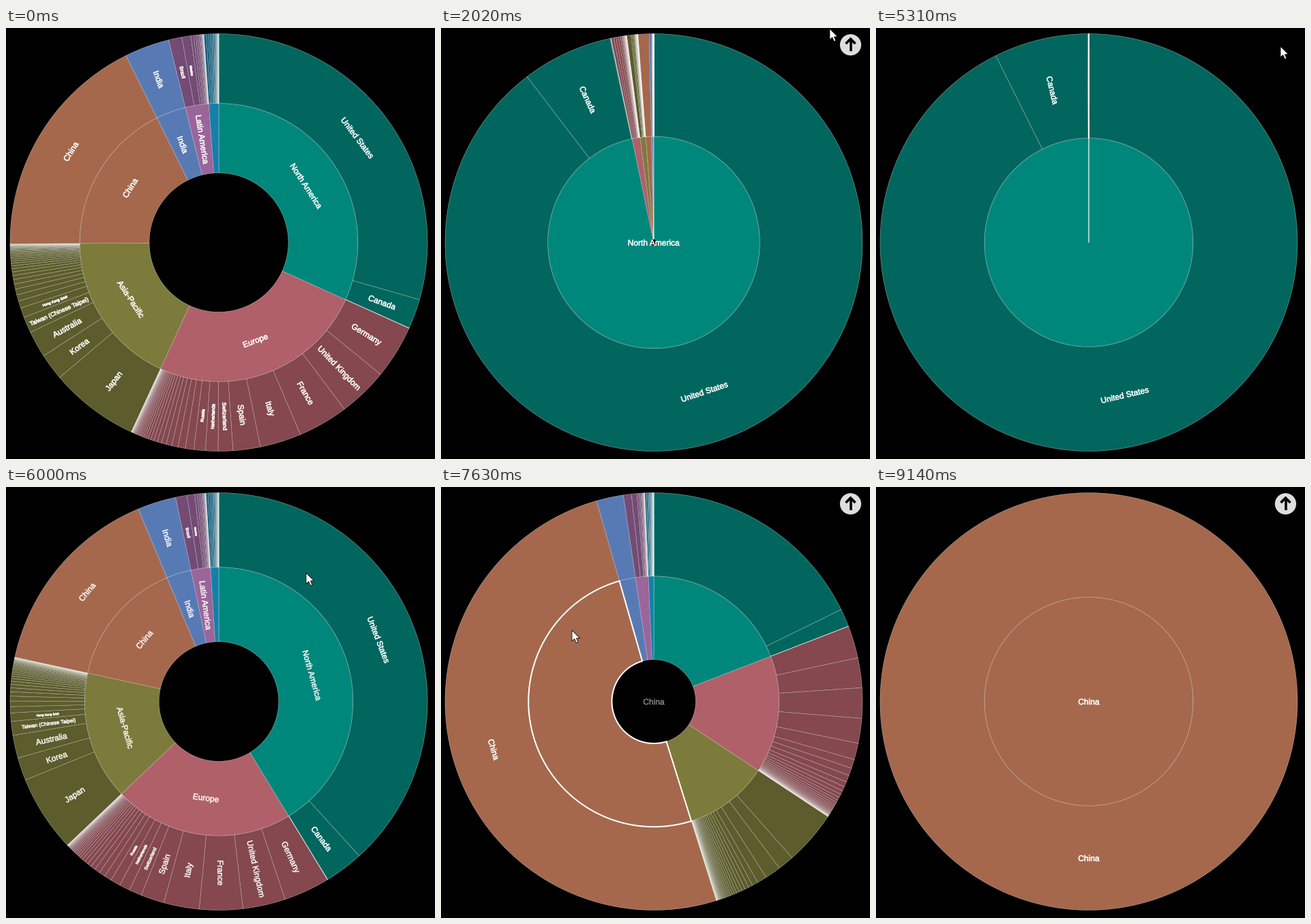
A matplotlib script for the animation above (9850 ms loop, 629 px wide and 632 px high).

```python
import numpy as np
import matplotlib.pyplot as plt
from matplotlib.animation import FuncAnimation
from matplotlib.collections import PathCollection
from matplotlib.patches import Circle, PathPatch, Polygon
from matplotlib.path import Path
from matplotlib.patheffects import Stroke

W, H = 629, 632
STEP, FRAMES = 50, 197
CX, CY, R = 312, 314.5, 306
ZOOM_MS, LAG = 1000, 30
FONT_MAX = 12
MIN_SPAN = {1: 9, 2: 2.4}  # narrowest labelled slice per ring, degrees

# name, end angle, inner colour, outer colour, named children, tail size, tail ratio
REGIONS = [
    ("North America", 114.3, "#00877c", "#01665e",
     [("United States", 105.9), ("Canada", 114.2)], 3, 0.5),
    ("Europe", 204.8, "#b06068", "#84484e",
     [("Germany", 129.2), ("United Kingdom", 143), ("France", 157),
      ("Italy", 168.5), ("Spain", 176.1), ("Switzerland", 180.2),
      ("Netherlands", 183.7), ("Russia", 186.9)], 32, 0.87),
    ("Asia-Pacific", 269.6, "#7c7b3b", "#5c5c2c",
     [("Japan", 229.7), ("Korea", 237.1), ("Australia", 244.5),
      ("Taiwan (Chinese Taipei)", 249), ("Hong Kong SAR", 251.7)], 34, 0.89),
    ("China", 333.6, "#a5684c", "#a5684c", [("China", 333.6)], 0, 1),
    ("India", 346.1, "#587ab4", "#587ab4", [("India", 346.1)], 0, 1),
    ("Latin America", 355.9, "#9a659b", "#734b75",
     [("Brazil", 349.8), ("Mexico", 352.3)], 16, 0.79),
    ("", 360, "#167fa8", "#105f7e", [], 20, 0.84),
]

# start time, focused region, phase
STAGES = [
    (0, None, "rest"),
    (1214, "North America", "in"),
    (2244, "North America", "rest"),
    (5312, "North America", "out"),
    (6342, None, "rest"),
    (7122, "China", "in"),
    (8152, "China", "rest"),
]

# time, x, y of the pointer tip
POINTER = np.array([
    (250, 548, 500), (810, 466, 312), (1640, 466, 312), (2020, 570, 1),
    (2120, 574, -25), (2450, 560, -25), (3090, 351, 308), (3780, 351, 308),
    (4980, 603, 14), (5130, 603, 14), (5310, 593, 27), (5600, 593, 27),
    (6015, 440, 126), (6610, 176, 195), (6910, 176, 195), (6920, 193, 206),
    (7120, 192, 210), (8140, 192, 210), (8500, 500, 470), (8770, 500, 470),
    (8870, 556, 640),
])
ARROW = np.array([(0, 0), (0, 16), (3.8, 12.6), (6.4, 18.6), (9, 17.4),
                  (6.5, 11.8), (11.6, 11.6)])


def lerp(a, b, p):
    return a + (b - a) * p


def ease(u):
    u = min(max(u, 0), 1)
    return 4 * u ** 3 if u < 0.5 else 1 - 4 * (1 - u) ** 3


class Slice:
    def __init__(self, name, region, depth, a0, a1, color):
        self.name, self.region, self.depth = name, region, depth
        self.a0, self.a1, self.color = a0, a1, color
        self.wide = a1 - a0 > 30
        self.text = None

    def zoomed(self, focus):
        """Angles and radii when the focus region fills the disc."""
        span = focus.a1 - focus.a0
        a0, a1 = np.clip([(a - focus.a0) / span for a in (self.a0, self.a1)], 0, 1) * 360
        return np.array([a0, a1, R / 2 * (self.depth - 1), R / 2 * self.depth])

    def place(self, focus, p):
        home = np.array([self.a0, self.a1, R / 3 * self.depth, R / 3 * (self.depth + 1)])
        return home if focus is None else lerp(home, self.zoomed(focus), p)


def build_slices():
    inner, outer = [], []
    start = 0
    for name, end, color, dark, children, count, ratio in REGIONS:
        inner.append(Slice(name, name, 1, start, end, color))
        a = start
        for child, a1 in children:
            outer.append(Slice(child, name, 2, a, a1, dark))
            a = a1
        if count:
            edges = np.cumsum(ratio ** np.arange(count))
            for a1 in a + (end - a) * edges / edges[-1]:
                outer.append(Slice("", name, 2, a, a1, dark))
                a = a1
        start = end
    return inner, outer


def arc(a0, a1, r):
    n = max(2, int(abs(a1 - a0) / 1.5) + 2)
    th = np.radians(np.linspace(a0, a1, n))
    return np.column_stack([CX + r * np.sin(th), CY - r * np.cos(th)])


def sector(a0, a1, r0, r1):
    """Ring sector; a full turn has no radial edges."""
    outside, inside = arc(a0, a1, r1), arc(a1, a0, r0)
    if a1 - a0 < 359.99:
        return Path(np.vstack([outside, inside, outside[:1]]), closed=True)
    loops = [outside] if r0 < 0.5 else [outside, inside]
    return Path.make_compound_path(*[Path(loop, closed=True) for loop in loops])


def stage_at(t):
    start, name, phase = [s for s in STAGES if s[0] <= t][-1]
    focus = next((s for s in inner if s.name == name), None) if name else None
    progress = ease((t - start - LAG) / ZOOM_MS)
    p = {"in": progress, "out": 1 - progress, "rest": float(focus is not None)}[phase]
    return focus, phase, p


def pointer_at(t):
    times = POINTER[:, 0]
    if not times[0] <= t <= times[-1]:
        return None
    i = min(np.searchsorted(times, t, side="right") - 1, len(times) - 2)
    u = (t - times[i]) / (times[i + 1] - times[i])
    return lerp(POINTER[i, 1:], POINTER[i + 1, 1:], u * u * (3 - 2 * u))


def hovered(tip, focus, phase, p):
    """Inner slice to outline: any at the overview, only the focus while zooming in."""
    if tip is None or phase == "out" or (phase == "rest" and focus):
        return None
    dx, dy = tip[0] - CX, tip[1] - CY
    r, a = np.hypot(dx, dy), np.degrees(np.arctan2(dx, -dy)) % 360
    for s in inner if focus is None else [focus]:
        a0, a1, r0, r1 = s.place(focus, p)
        if a0 <= a <= a1 and r0 <= r <= r1:
            return sector(a0, a1, r0, r1)
    return None


def label_alpha(s, focus, phase, p):
    fits_home = s.a1 - s.a0 >= MIN_SPAN[s.depth]
    if focus is None:
        return float(fits_home)
    if s.region == focus.region and s.depth == 2:
        return 1.0
    if phase == "out":
        return (1 - p) * fits_home
    return p if s is focus else 0.0


def put_label(s, focus, phase, p):
    alpha = label_alpha(s, focus, phase, p)
    s.text.set_visible(alpha > 0.01)
    if alpha <= 0.01:
        return
    a0, a1, r0, r1 = s.place(focus, p)
    size = min(FONT_MAX, max(1, 1.95 * (a1 - a0)))
    mid, r = (a0 + a1) / 2, (r0 + r1) / 2
    if s is focus and phase != "out":
        r, turn, size = 0, 0, FONT_MAX
    elif s.wide:
        turn = -mid + 180 * (90 < mid < 270)
    else:
        turn = 90 - mid + 180 * (mid > 180)
    th = np.radians(mid)
    s.text.set(position=(CX + r * np.sin(th), CY - r * np.cos(th)),
               rotation=turn, fontsize=size, alpha=alpha)


def draw(i):
    t = i * STEP + 15
    focus, phase, p = stage_at(t)
    shown = slices
    if focus and phase == "rest":
        shown = [s for s in slices if s.region == focus.region]
    disc.set_paths([sector(*s.place(focus, p)) for s in shown])
    disc.set_facecolor([s.color for s in shown])

    for s in slices:
        if s.text:
            put_label(s, focus, phase, p)

    tip = pointer_at(t)
    pointer.set_visible(tip is not None)
    if tip is not None:
        pointer.set_xy(ARROW + tip)
    edge = hovered(tip, focus, phase, p)
    outline.set_visible(edge is not None)
    if edge is not None:
        outline.set_path(edge)
    for part in button:
        part.set_visible(focus is not None and phase != "out")
    return []


plt.rcParams["font.family"] = "Liberation Sans"
fig = plt.figure(figsize=(W / 72, H / 72), dpi=72, facecolor="black")
ax = fig.add_axes([0, 0, 1, 1])
ax.set(xlim=(0, W), ylim=(H, 0))
ax.axis("off")

inner, outer = build_slices()
slices = inner + outer

disc = PathCollection([], linewidths=0.55, edgecolors=(1, 1, 1, 0.55), snap=False)
ax.add_collection(disc, autolim=False)
outline = PathPatch(sector(0, 90, 100, 200), fc="none", ec="white", lw=2,
                    snap=False, zorder=2)
ax.add_patch(outline)

for s in slices:
    if s.name:
        s.text = ax.text(CX, CY, s.name, color="white", ha="center",
                         va="center_baseline", rotation_mode="anchor", zorder=3,
                         path_effects=[Stroke(linewidth=0.6, foreground="white")])

button = [
    ax.add_patch(Circle((600.5, 24.7), 15.6, fc="#dedede", ec="none", zorder=4)),
    ax.plot([600.5, 600.5], [34, 17], color="black", lw=3.6,
            solid_capstyle="butt", zorder=5)[0],
    ax.plot([593.5, 600.5, 607.5], [23, 16, 23], color="black", lw=3.6,
            solid_capstyle="butt", solid_joinstyle="miter", zorder=5)[0],
]
pointer = ax.add_patch(Polygon(ARROW, closed=True, fc="white", ec="black", lw=0.8, zorder=6))

anim = FuncAnimation(fig, draw, frames=FRAMES, init_func=lambda: [], interval=STEP,
                     repeat=True, repeat_delay=0, blit=False)
plt.show()
```
